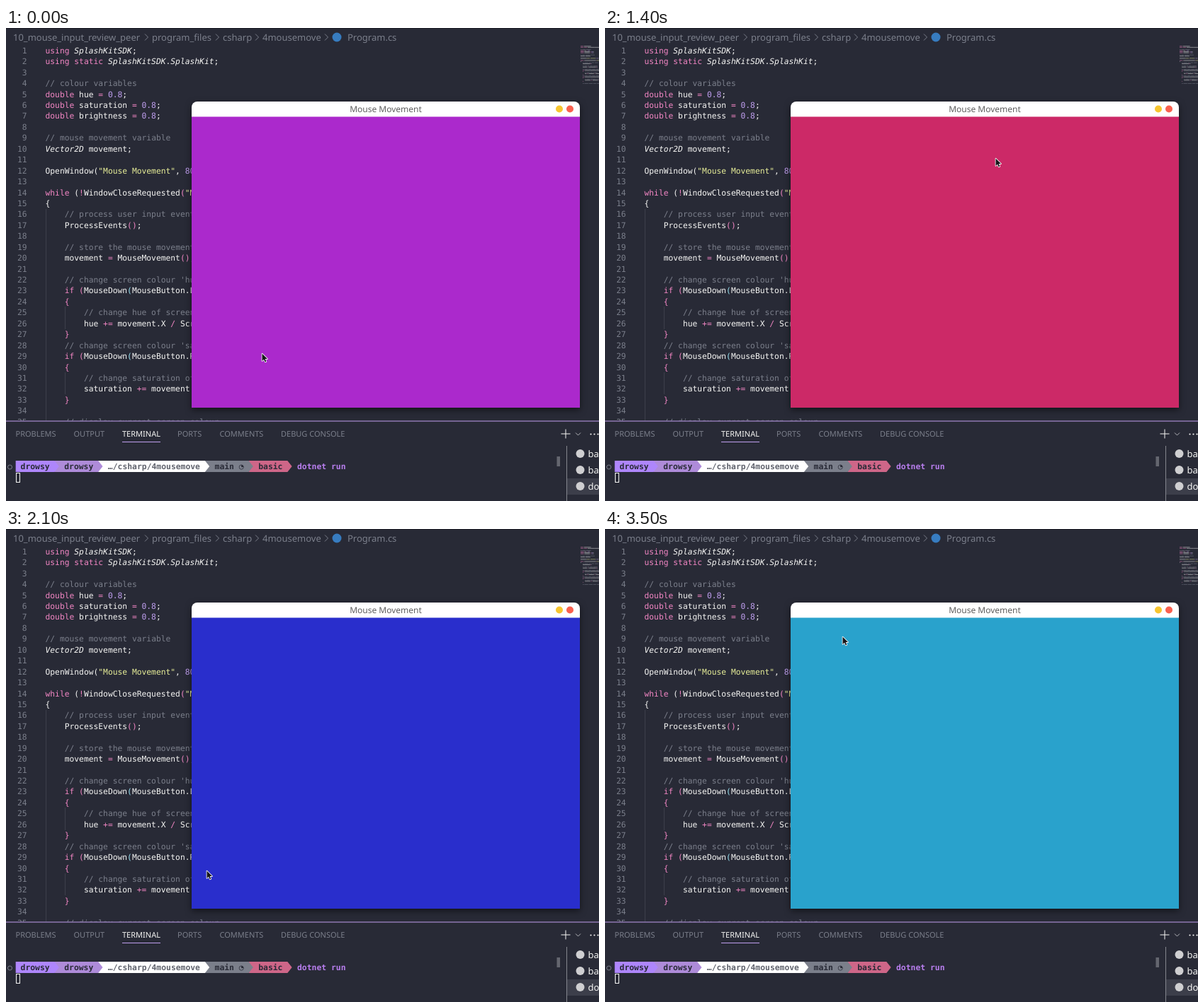
Write an HTML page with a canvas that moves like this. It is 837 by 669 pixels and loops after 4.2 s.

```html
<!DOCTYPE html>
<html lang="en">
<head>
<meta charset="utf-8">
<title>Mouse Movement</title>
<style>
  html, body { margin: 0; width: 100%; height: 100%; overflow: hidden; background: #282a36; }
  canvas { display: block; }
</style>
</head>
<body>
<canvas id="stage" width="837" height="669"></canvas>
<script>
const ctx = document.getElementById('stage').getContext('2d');
const W = 837, H = 669, STEP = 700;
const BG = '#282a36', FG = '#f6f6f4', GREY = '#7b7f8b', PINK = '#f286c4',
      PURPLE = '#bf9eee', YELLOW = '#e7ee98', CYAN = '#97e1f1';
const SANS = '"Noto Sans", sans-serif', MONO = '"DejaVu Sans Mono", monospace';

// Window hue in degrees and pointer tip for each step
const steps = [
  { hue: 288, x: 361, y: 460 },
  { hue: 338, x: 452, y: 163 },
  { hue: 337, x: 551, y: 184 },
  { hue: 238, x: 283, y: 483 },
  { hue: 176, x: 293, y: 228 },
  { hue: 195.5, x: 335, y: 152 }
];

const code = `using SplashKitSDK;
using static SplashKitSDK.SplashKit;

// colour variables
double hue = 0.8;
double saturation = 0.8;
double brightness = 0.8;

// mouse movement variable
Vector2D movement;

OpenWindow("Mouse Movement", 800, 600);

while (!WindowCloseRequested("Mouse Movement"))
{
    // process user input events
    ProcessEvents();

    // store the mouse movement
    movement = MouseMovement();

    // change screen colour 'hue'
    if (MouseDown(MouseButton.LeftButton))
    {
        // change hue of screen
        hue += movement.X / ScreenWidth();
    }
    // change screen colour 'saturation'
    if (MouseDown(MouseButton.RightButton))
    {
        // change saturation of screen
        saturation += movement.Y / ScreenHeight();
    }

    // display current screen colour`.split('\n');

const rules = [
  [/^\/\/.*/, GREY],
  [/^"[^"]*"/, YELLOW],
  [/^(using|static|double|while|if)\b/, PINK],
  [/^(SplashKitSDK|SplashKit|Vector2D)\b/, FG, 'italic '],
  [/^\d+(\.\d+)?/, PURPLE],
  [/^[=+\/!]+/, PINK],
  [/^[(){}]/, null],
  [/^\w+/, FG],
  [/^\s+/, FG],
  [/^./, FG]
];

function tokenize(lines) {
  const palette = [FG, PINK, CYAN], tokens = [];
  let depth = 0;
  lines.forEach((line, row) => {
    let col = 0;
    while (col < line.length) {
      const rest = line.slice(col);
      const [pattern, color, style = ''] = rules.find(rule => rule[0].test(rest));
      const text = rest.match(pattern)[0];
      let fill = color;
      if (!fill) fill = palette['({'.includes(text) ? depth++ % 3 : --depth % 3];
      if (text.trim()) tokens.push({ text, row, col, fill, style });
      col += text.length;
    }
  });
  return tokens;
}
const tokens = tokenize(code);

function rect(x, y, w, h, color) {
  ctx.fillStyle = color;
  ctx.fillRect(x, y, w, h);
}

function label(text, x, y, color, font, align = 'left') {
  ctx.font = font;
  ctx.textAlign = align;
  ctx.fillStyle = color;
  ctx.fillText(text, x, y);
}

function dot(x, y, r, color) {
  ctx.fillStyle = color;
  ctx.beginPath();
  ctx.arc(x, y, r, 0, Math.PI * 2);
  ctx.fill();
}

function line(points, color, width = 1) {
  ctx.strokeStyle = color;
  ctx.lineWidth = width;
  ctx.beginPath();
  points.forEach(([x, y]) => ctx.lineTo(x, y));
  ctx.stroke();
}

function drawBreadcrumb() {
  const font = '13px ' + SANS;
  rect(0, 0, W, 1, '#1d1e27');
  [['10_mouse_input_review_peer', 10], ['program_files', 206], ['csharp', 306],
   ['4mousemove', 362], ['Program.cs', 482]].forEach(([text, x]) => label(text, x, 17.5, GREY, font));
  [196, 296, 352, 450].forEach(x => line([[x, 8.5], [x + 4.5, 13], [x, 17.5]], GREY));
  dot(467, 13, 6.5, '#377cc0');
}

function drawEditor() {
  const size = 11.3, charW = 6.8, rowH = 15.44, left = 55.5, base = 35.8;
  ctx.save();
  ctx.beginPath();
  ctx.rect(0, 22, W, 533.5);
  ctx.clip();
  rect(56, 256, 1, 300, '#3d3f4b');
  rect(83, 394, 1, 32, '#3d3f4b');
  rect(83, 487, 1, 31, '#3d3f4b');
  code.forEach((_, row) =>
    label(row + 1, 29.5, base + row * rowH, GREY, `${size}px ${MONO}`, 'right'));
  for (const t of tokens) {
    label(t.text, left + t.col * charW, base + t.row * rowH, t.fill, `${t.style}${size}px ${MONO}`);
  }
  // Minimap
  ctx.globalAlpha = 0.5;
  for (const t of tokens) {
    for (const word of t.text.matchAll(/\S+/g)) {
      rect(811 + (t.col + word.index) * 0.77, 25.3 + t.row * 1.55, word[0].length * 0.77, 0.95, t.fill);
    }
  }
  ctx.restore();
}

function drawPanel() {
  rect(0, 555.5, W, 1, PURPLE);
  const tabs = [['PROBLEMS', 13.5], ['OUTPUT', 95.5], ['TERMINAL', 164], ['PORTS', 242],
                ['COMMENTS', 301.5], ['DEBUG CONSOLE', 388]];
  tabs.forEach(([text, x]) => label(text, x, 578, text === 'TERMINAL' ? FG : GREY, '11px ' + SANS));
  rect(164, 585, 54, 1, PURPLE);

  line([[783.5, 574], [796.5, 574]], FG);
  line([[790, 567.5], [790, 580.5]], FG);
  line([[804, 572.5], [807.5, 576], [811, 572.5]], '#b5b6bb');
  [825.5, 830.5, 835.5].forEach(x => dot(x, 574.5, 1.1, FG));

  rect(777.5, 606, 4.5, 14, '#64666f');
  rect(792, 637, 45, 23, '#3c3e4a');
  rect(791, 591, 1, 78, '#85878f');
  [['ba', 602], ['ba', 625], ['do', 648]].forEach(([text, y]) => {
    dot(810.5, y, 6, '#cfcfd1');
    label(text, 821.5, y + 4.5, FG, '13px ' + SANS);
  });
}

function drawPrompt() {
  const cell = 6.85, left = 13.7, top = 612, height = 16, dark = '#282a36';
  const colX = col => left + col * cell;
  const font = `bold 11.38px ${MONO}`;
  const segments = [
    ['drowsy', 0, 8, '#ae86fb', dark],
    ['drowsy', 8, 17, '#ae8bd9', dark],
    ['…/csharp/4mousemove', 17, 39, '#ffffff', '#60636d'],
    ['main ◔', 39, 48, '#7b7f8b', dark],
    ['basic', 48, 56, '#ce6688', dark]
  ];
  // Right to left, so that each arrow tip lies over the next segment
  for (const [text, from, to, color, ink] of [...segments].reverse()) {
    ctx.fillStyle = color;
    ctx.beginPath();
    ctx.moveTo(colX(from), top);
    ctx.lineTo(colX(to), top);
    ctx.lineTo(colX(to + 1) - 0.5, top + height / 2);
    ctx.lineTo(colX(to), top + height);
    ctx.lineTo(colX(from), top + height);
    ctx.fill();
    label(text, colX(from + (from ? 2 : 1)), 623.8, ink, font);
  }
  label('dotnet run', colX(58), 623.8, '#b87eee', font);

  ctx.strokeStyle = GREY;
  ctx.lineWidth = 1;
  ctx.beginPath();
  ctx.arc(5.5, 621, 3, 0, Math.PI * 2);
  ctx.stroke();
  ctx.strokeStyle = FG;
  ctx.strokeRect(14.5, 629.5, 5, 13);
}

function drawWindow(hue) {
  const x = 262, y = 104, w = 548, h = 433, bar = 21.5;
  ctx.save();
  ctx.shadowColor = 'rgba(0,0,0,0.55)';
  ctx.shadowBlur = 10;
  ctx.shadowOffsetY = 3;
  ctx.fillStyle = '#fff';
  ctx.beginPath();
  ctx.roundRect(x, y, w, h, [8, 8, 0, 0]);
  ctx.fill();
  ctx.restore();
  rect(x, y + bar, w, h - bar, `hsl(${hue}, 66.7%, 48%)`);
  label('Mouse Movement', x + w / 2, 118.6, '#5f5f5f', '12px ' + SANS, 'center');
  dot(781, 114.5, 5, '#f7c52f');
  dot(796, 114.5, 5, '#f9604f');
}

function drawPointer(x, y) {
  const arrow = new Path2D('M.5 .5V11L3 8.7L4.7 12.4L6.3 11.7L4.7 8.1H8Z');
  ctx.save();
  ctx.translate(x, y);
  ctx.lineJoin = 'round';
  ctx.lineWidth = 1.6;
  ctx.strokeStyle = '#fff';
  ctx.stroke(arrow);
  ctx.fillStyle = '#16161a';
  ctx.fill(arrow);
  ctx.restore();
}

function frame(now) {
  const { hue, x, y } = steps[Math.floor(now / STEP) % steps.length];
  ctx.textRendering = 'geometricPrecision';
  rect(0, 0, W, H, BG);
  drawBreadcrumb();
  drawEditor();
  drawPanel();
  drawPrompt();
  drawWindow(hue);
  drawPointer(x, y);
  requestAnimationFrame(frame);
}
frame(performance.now());
</script>
</body>
</html>
```
